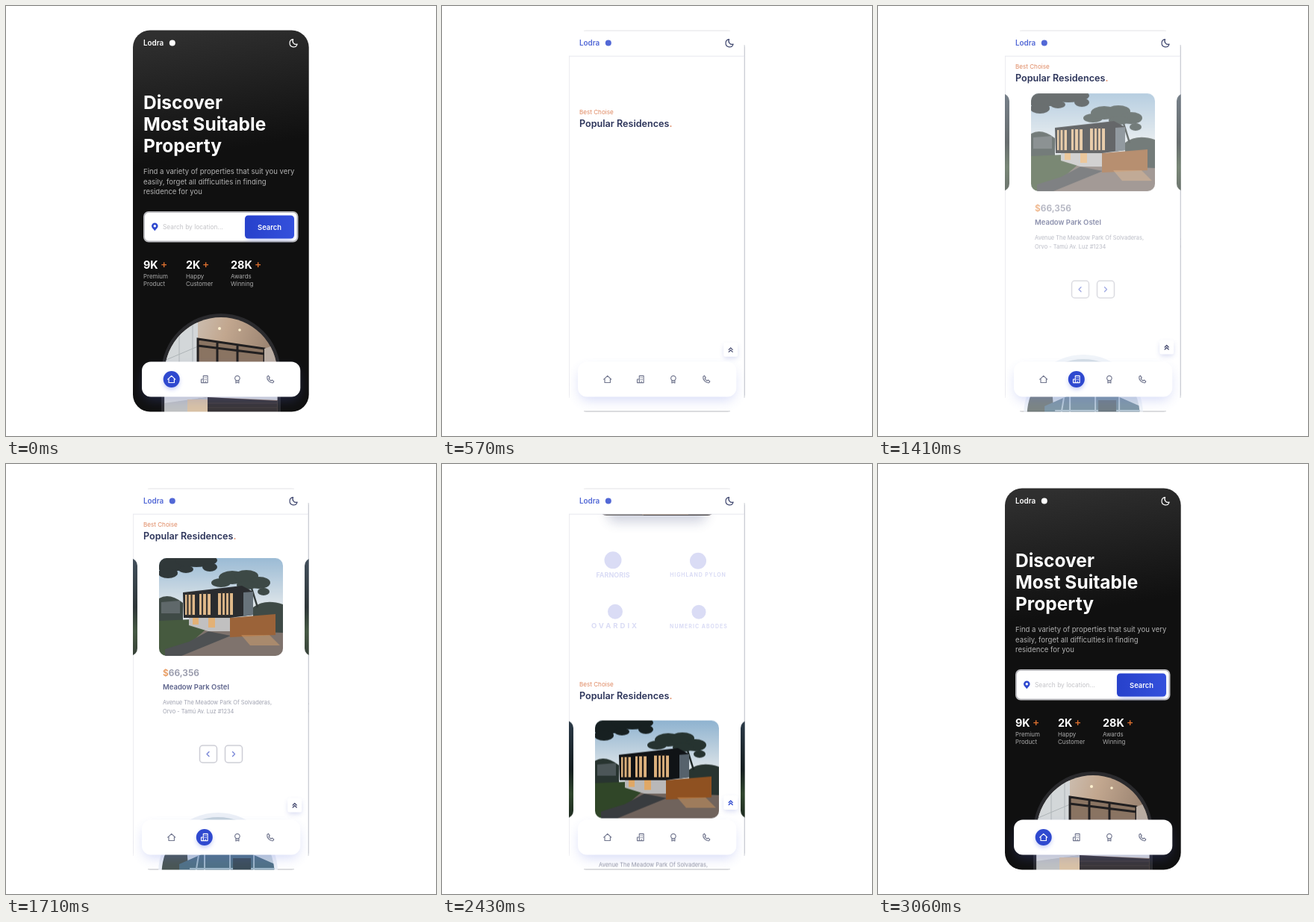
An HTML page that plays this animation: 576 by 576 pixels, repeating every 3.09 s.

```html
<!DOCTYPE html>
<html lang="en">
<head>
<meta charset="utf-8">
<title>Property app</title>
<style>
html, body { margin: 0; width: 100%; height: 100%; overflow: hidden; background: #fff; }
svg { display: block; width: 100vw; height: 100vh; }
text { font-family: Inter, "Open Sans", sans-serif; white-space: pre; }
.h1 { font-size: 24.5px; font-weight: 700; fill: #fff; }
.lead { font-size: 9.55px; fill: #b2b2b2; }
.num { font-size: 14.4px; font-weight: 700; fill: #fff; }
.plus { font-size: 14px; font-weight: 500; fill: #e0722f; }
.small { font-size: 7.9px; fill: #ababab; }
.brand { fill: #dadcf5; font-weight: 700; text-anchor: middle; }
.line { fill: none; stroke-linecap: round; stroke-linejoin: round; }
</style>
</head>
<body>
<svg viewBox="0 0 576 576">
<defs>
  <mask id="phone" maskUnits="userSpaceOnUse" x="0" y="0" width="576" height="576">
    <rect x="170" y="32.500" width="235.700" height="511" rx="23" fill="#fff"/>
  </mask>
  <clipPath id="arch"><path d="M212.500 589V492.500a75.500 75.500 0 0 1 151 0V589q0 8-8 8H220.500q-8 0-8-8z"/></clipPath>
  <clipPath id="photo"><rect width="166" height="131" rx="10"/></clipPath>
  <linearGradient id="dark" gradientUnits="userSpaceOnUse" x1="262" y1="32" x2="290" y2="195">
    <stop stop-color="#2f2f2f"/><stop offset="1" stop-color="#101010"/>
  </linearGradient>
  <linearGradient id="blue"><stop stop-color="#2741cb"/><stop offset="1" stop-color="#3450dc"/></linearGradient>
  <linearGradient id="sky" x2="0" y2="1"><stop stop-color="#8fb3d0"/><stop offset=".5" stop-color="#dde4e8"/></linearGradient>
  <linearGradient id="ceiling" x2="1" y2=".4"><stop stop-color="#d5d3cf"/><stop offset=".5" stop-color="#c2a78f"/><stop offset="1" stop-color="#8d7767"/></linearGradient>
  <linearGradient id="peek" x2="0" y2="1"><stop stop-color="#2b3a48"/><stop offset=".5" stop-color="#141d1f"/><stop offset=".75" stop-color="#2f452c"/><stop offset="1" stop-color="#1d291f"/></linearGradient>
  <filter id="blur" x="-30%" y="-60%" width="160%" height="220%"><feGaussianBlur stdDeviation="8"/></filter>
  <filter id="soft" x="-60%" y="-60%" width="220%" height="220%"><feGaussianBlur stdDeviation="3"/></filter>
</defs>

<g mask="url(#phone)">
  <rect x="168" y="30" width="240" height="516" fill="#fff"/>
  <path d="M170.500 52V525" stroke="#ececf0"/>
  <path d="M405.300 52V525" stroke="#a4a8b4"/>
  <path d="M190 543.200H386" stroke="#92949c"/>

  <g id="page">
    <rect x="168" y="30" width="240" height="554" fill="url(#dark)"/>
    <text class="h1" x="184" y="138">Discover</text>
    <text class="h1" x="184" y="167.200">Most Suitable</text>
    <text class="h1" x="184" y="196.400">Property</text>
    <text class="lead" x="184" y="224.500">Find a variety of properties that suit you very</text>
    <text class="lead" x="184" y="238.500">easily, forget all difficulties in finding</text>
    <text class="lead" x="184" y="252.200">residence for you</text>

    <rect x="185" y="276" width="205.500" height="39.500" rx="6" fill="#fff" stroke="#b9b9bd" stroke-width="2"/>
    <path d="M199.300 301.300C197 298.500 195 297 195 294.800a4.300 4.300 0 0 1 8.600 0C203.600 297 201.600 298.500 199.300 301.300z" fill="#2f49cf"/>
    <circle cx="199.300" cy="294.800" r="1.700" fill="#fff"/>
    <text x="210" y="298.600" font-size="8.400" fill="#c3c3c7">Search by location...</text>
    <rect x="322" y="285" width="62" height="28" rx="5" fill="#3a57e0" opacity=".35" filter="url(#soft)"/>
    <rect x="320" y="280.500" width="66" height="31" rx="4.500" fill="url(#blue)"/>
    <text x="353" y="299.600" font-size="9.400" font-weight="600" fill="#fff" text-anchor="middle">Search</text>
    <g id="stats"></g>

    <rect x="222" y="524" width="132" height="82" rx="10" fill="#26356d" opacity=".22" filter="url(#blur)"/>
    <path d="M208 584V492a80 80 0 0 1 160 0V584z" fill="#2a2a2d"/>
    <g clip-path="url(#arch)">
      <rect x="212" y="416" width="153" height="182" fill="url(#ceiling)"/>
      <path d="M205 452L257 418V600H205z" fill="#d3d7d9"/>
      <path d="M205 478L257 456M232 430V540M250 420V540" stroke="#aeb4b7" fill="none"/>
      <path d="M257 446L346 459V490H257z" fill="#8a7462"/>
      <path d="M257 446L346 459V490H257zM283 450V490M310 454V490M257 455L346 466" fill="none" stroke="#211f20" stroke-width="3"/>
      <path d="M346 459L366 452V520H346z" fill="#b9aca2"/>
      <path d="M205 490H366V528L270 524 205 533z" fill="#dadbda"/>
      <path d="M205 533L270 524V598H205z" fill="#bfc1c2"/>
      <path d="M270 524L366 529V598H270z" fill="#383436"/>
      <path d="M270 532H366M270 538H366M270 544H366M270 550H366" stroke="#4c4546" stroke-width=".8"/>
      <rect x="243" y="527" width="27" height="63" fill="#d9c2a5"/>
      <path d="M205 588H366V600H205z" fill="#2b2728"/>
      <path d="M268 589H330V596H268z" fill="#a46f42"/>
      <g fill="#fff1cf"><circle cx="286" cy="432" r="2"/><circle cx="313" cy="434" r="1.800"/></g>
    </g>

    <g id="brands"></g>

    <text x="184" y="826" font-size="8.100" fill="#df8861">Best Choise</text>
    <text x="184" y="843.300" font-size="12.600" font-weight="600" fill="#2b3359">Popular Residences<tspan fill="#df8861">.</tspan></text>

    <g id="cards">
      <rect x="120" y="872" width="56" height="131" rx="10" fill="url(#peek)"/>
      <rect x="400" y="872" width="56" height="131" rx="10" fill="url(#peek)"/>
      <g transform="translate(205 872)">
        <g clip-path="url(#photo)">
          <rect width="166" height="131" fill="url(#sky)"/>
          <path d="M0 54Q14 46 32 60V92H0zM126 66Q142 54 166 62V110H126z" fill="#27332f"/>
          <path d="M3 59L28 57V74H3z" fill="#4b5557"/>
          <g fill="#161f20">
            <ellipse cx="16" cy="3" rx="30" ry="15"/><ellipse cx="50" cy="3" rx="28" ry="9"/>
            <ellipse cx="12" cy="20" rx="13" ry="7"/><ellipse cx="36" cy="15" rx="10" ry="5"/><ellipse cx="68" cy="12" rx="10" ry="6"/>
          </g>
          <path d="M112 50L106 28M132 66L122 34" stroke="#1b2423" stroke-width="2.500"/>
          <g fill="#25322f">
            <ellipse cx="83" cy="33" rx="13" ry="6"/><ellipse cx="98" cy="26" rx="18" ry="9"/><ellipse cx="117" cy="24" rx="16" ry="8"/>
            <ellipse cx="134" cy="33" rx="15" ry="8"/><ellipse cx="118" cy="36" rx="14" ry="6"/><ellipse cx="140" cy="45" rx="8" ry="5"/>
          </g>
          <path d="M0 84L44 82 64 98 40 131H0z" fill="#2f4527"/>
          <path d="M62 96L166 100V131H22z" fill="#6f625b"/>
          <path d="M66 98L40 112 8 122V131H30L96 104z" fill="#383b3e"/>
          <path d="M40 78H100V98H66L40 90z" fill="#b9b8b8"/>
          <path d="M45 80h8v9h-8zM66 80h9v13h-9z" fill="#e0a865"/>
          <path d="M95 80L156 75V103L95 106z" fill="#8f5020"/>
          <path d="M110 103h38l14 14h-40z" fill="#d79a5c" opacity=".45"/>
          <path d="M32 46L111 37 126 45V76L95 80 33 80z" fill="#0f1215"/>
          <path d="M113 46L126 45V76L113 78z" fill="#55616b"/>
          <path d="M35 49h13v27h-13zM54 48h15v28h-15zM79 47h20v29h-20z" fill="#dcb17c"/>
          <path d="M38.500 47V78M43.500 47V78M58 46V78M64 46V78M84 45V78M89 45V78M94 45V78" stroke="#1f1a17" stroke-width="2.200"/>
        </g>
        <text x="5" y="157.500" font-size="12" font-weight="600" fill="#85889c"><tspan fill="#e58a45">$</tspan>66,356</text>
        <text x="5" y="175.800" font-size="9.500" font-weight="600" fill="#474e7c">Meadow Park Ostel</text>
        <g font-size="7.450" fill="#9194a4">
          <text x="5" y="195.700">Avenue The Meadow Park Of Solvaderas,</text>
          <text x="5" y="207.500">Orvo - Tamú Av. Luz #1234</text>
          <text x="200" y="195.700">Avenue</text>
          <text x="200" y="207.500">Orvo</text>
        </g>
        <g class="line" stroke="#c6c7d0" stroke-width="1.500">
          <rect x="54.500" y="251" width="23" height="23" rx="4"/><rect x="88.500" y="251" width="23" height="23" rx="4"/>
          <path d="M67 259.500l-3 3 3 3M98.500 259.500l3 3-3 3" stroke="#5f6fd0" stroke-width="1.300"/>
        </g>
      </g>
    </g>

    <g id="value">
      <path d="M208 1380V1289a80 80 0 0 1 160 0V1380z" fill="#e9eef6"/>
      <g transform="translate(0 798)"><g clip-path="url(#arch)">
        <rect x="212" y="416" width="153" height="182" fill="#bccbd7"/>
        <path d="M212 456H246L256 600H212z" fill="#34423f"/>
        <path d="M236 480L300 452 364 480V600H236z" fill="#3b6078"/>
        <path d="M240 600L262 468M270 600V466M304 454V600M336 468V600M250 486H364" stroke="#93afc3" stroke-width="2"/>
        <path d="M308 472h24v50h-24z" fill="#253946"/>
      </g></g>
    </g>
  </g>

  <g id="bar">
    <rect x="168" y="30" width="240" height="37" fill="#fff"/>
    <path d="M170 67.200H405" stroke="#e6e7ee"/>
    <path d="M405.300 52V67" stroke="#a4a8b4"/>
  </g>
  <path id="edge" d="M190 32.900H386" stroke="#d6d6da"/>
  <text id="logo" x="184" y="53.300" font-size="9.900" font-weight="600">Lodra</text>
  <circle id="mark" cx="222.800" cy="49.600" r="4"/>
  <path id="moon" class="line" stroke-width="1.200" d="M384.600 44.700a5.100 5.100 0 1 0 5.500 6.400a4.500 4.500 0 0 1-5.500-6.400z"/>

  <g id="up">
    <rect x="-9" y="-6" width="18" height="18" rx="3" fill="#5866c8" opacity=".22" filter="url(#soft)"/>
    <rect x="-9.500" y="-9.500" width="19" height="19" rx="2.500" fill="#fff"/>
    <path id="upIcon" class="line" stroke-width="1.300" d="M-2.500 0L0-2.500 2.500 0M-2.500 3L0 .5 2.500 3"/>
  </g>

  <rect x="184" y="486" width="208" height="42" rx="12" fill="#5c6ee0" opacity=".24" filter="url(#blur)"/>
  <rect x="182" y="476.500" width="212.300" height="47" rx="12" fill="#fff"/>
  <g id="nav"></g>
</g>
</svg>

<script>
const LOOP = 3090, BOTTOM = 742;
const WHITE = [255, 255, 255], INK = [71, 76, 112], BLUE = [47, 73, 207];
const $ = id => document.getElementById(id);
const clamp = x => Math.min(1, Math.max(0, x));
const ramp = (t, from, to) => clamp((t - from) / (to - from));
const sine = u => (1 - Math.cos(Math.PI * u)) / 2;
const settle = (t, start, tau) => t < start ? 0 : 1 - Math.exp((start - t) / tau);
const mix = (a, b, k) => `rgb(${a.map((v, i) => Math.round(v + (b[i] - v) * k))})`;
const move = (id, x, y) => $(id).setAttribute('transform', `translate(${x} ${y})`);
const paint = (el, attrs) => { for (const k in attrs) el.setAttribute(k, attrs[k]); };

$('stats').innerHTML = [
  [184, 207, '9K', 'Premium', 'Product'],
  [241, 263, '2K', 'Happy', 'Customer'],
  [301, 333, '28K', 'Awards', 'Winning']
].map(([x, plusX, n, a, b]) => `
  <text class="num" x="${x}" y="351.600">${n}</text><text class="plus" x="${plusX}" y="351.200">+</text>
  <text class="small" x="${x}" y="365">${a}</text><text class="small" x="${x}" y="375.400">${b}</text>`).join('');

// name, centre x, mark y, mark radius, baseline, font size, letter spacing
$('brands').innerHTML = [
  ['FARNORIS', 229, 657, 11.5, 680, 9, 0],
  ['HIGHLAND PYLON', 343, 658, 11, 679.5, 7, .9],
  ['OVARDIX', 232, 726, 10, 748.5, 9.5, 3],
  ['NUMERIC ABODES', 344, 726.5, 9.5, 747.8, 7, 1]
].map(([name, x, cy, r, y, size, gap]) => `<circle cx="${x}" cy="${cy}" r="${r}" fill="#dadcf5"/>
  <text class="brand" x="${x}" y="${y}" font-size="${size}" letter-spacing="${gap}">${name}</text>`).join('');

const icons = [
  'M-5 .2L0-4.700 5 .2M-3.700-.8V4.500H3.700V-.8',
  'M-1.500-4.600H4.300V4.600H-1.500zM-1.500 0H-4.300V4.600H-1.500M.5-2.200h.2M2.300-2.200h.2M.5.3h.2M2.300.3h.2M1.300 4.500V2.800',
  'M0-4.700a3.300 3.300 0 1 1-.01 0zM-2 1.400V5L0 4 2 5V1.400',
  'M-4.200-3.400l1.600-1.400 1.900 2.600-1.100 1.200c.6 1.600 1.500 2.500 3 3.100l1.200-1.100 2.400 1.900-1.200 1.700c-4 .8-8.600-4-7.800-8z'
];
$('nav').innerHTML = icons.map((d, i) => `<g transform="translate(${221.7 + 44.1 * i} 500)">
  <g><circle cy="3" r="10" fill="#3a57e0" opacity=".4" filter="url(#soft)"/><circle r="11" fill="#2f49cf"/></g>
  <path class="line" stroke-width="1.150" d="${d}"/></g>`).join('');
const navItems = [...$('nav').children];

function draw(t) {
  const scroll = BOTTOM * (sine(ramp(t, 60, 687)) - sine(ramp(t, 2246.5, 2758)));
  move('page', 0, -scroll);

  const reveal = settle(t, 1150, 254), offset = -36 * (1 - reveal);
  move('cards', 0, offset);
  move('value', offset, 0);
  $('cards').style.opacity = $('value').style.opacity = reveal;
  $('brands').style.opacity = ramp(t, 380, 800);

  const solid = ramp(t, 140, 260) * (1 - ramp(t, 2715, 2900));
  const tint = mix(WHITE, [82, 104, 214], solid);
  $('bar').style.opacity = solid;
  $('edge').style.opacity = scroll > 30 ? solid : 0;
  paint($('logo'), { fill: tint });
  paint($('mark'), { fill: tint });
  paint($('moon'), { stroke: mix(WHITE, [62, 70, 110], solid) });

  const hover = ramp(t, 2190, 2250);
  move('up', 386.7, 457 - 3.5 * hover + 200 * (1 - settle(t, 285, 70) + settle(t, 2573, 70)));
  paint($('upIcon'), { stroke: mix(INK, BLUE, hover) });

  const active = scroll < 517 ? 0 : scroll > 707 ? 1 : -1;
  navItems.forEach((item, i) => {
    item.children[0].style.opacity = i === active ? 1 : 0;
    paint(item.children[1], { stroke: i === active ? '#fff' : '#71768e' });
  });
}

function tick() {
  draw(performance.now() % LOOP);
  requestAnimationFrame(tick);
}
tick();
</script>
</body>
</html>
```
